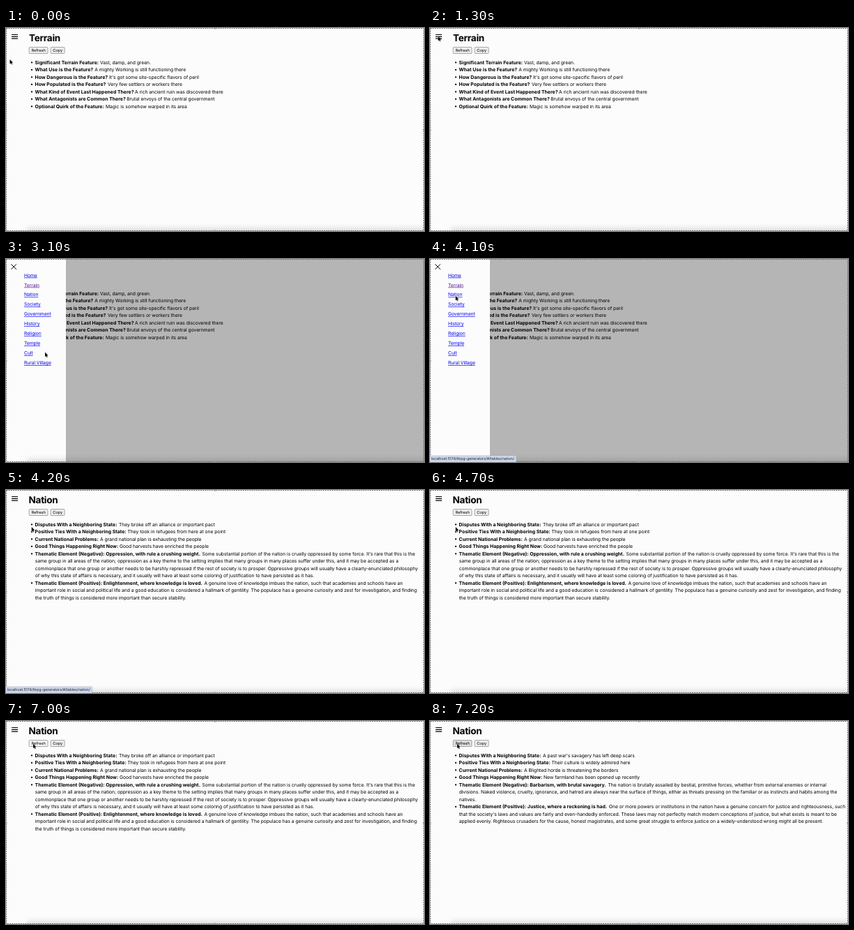
These frames come from a looping animation (600x291 px, 8000 ms). An HTML page:

```html
<!DOCTYPE html>
<html lang="en">
<head>
<meta charset="utf-8">
<title>Terrain and nation tables</title>
<style>
html, body { margin: 0; width: 100%; height: 100%; overflow: hidden; background: #fcfcfc; }
svg { display: block; width: 100%; height: 100%; }
text { font: 6.8px Inter, sans-serif; letter-spacing: -.009em; text-rendering: geometricPrecision; }
.bold { font-size: 6.9px; font-weight: 700; letter-spacing: 0; }
.title { font-size: 13.5px; font-weight: 700; letter-spacing: -.02em; }
.button { fill: #efefef; stroke: #707070; stroke-width: .6; }
.label { font-size: 5.7px; text-anchor: middle; }
.link { fill: #00e; letter-spacing: -.0125em; text-decoration: underline; }
.visited { fill: #551a8b; }
.status rect { fill: #cdd7ec; stroke: #a9b1c2; stroke-width: .5; }
.status text { font-size: 5.33px; fill: #222; }
.shade { filter: blur(4px); opacity: .13; }
.frame { fill: none; stroke: #707070; stroke-dasharray: 2 1.2; }
.handle { fill: #9a9a9a; }

#terrain, #nation, #before, #after, #menu, #society, #target, #refresh, #cursor {
  animation: 8s step-end infinite;
}
#terrain { animation-name: terrain; }
#nation { animation-name: nation; }
#before { animation-name: before; }
#after { animation-name: after; }
#menu { animation-name: menu; }
#society { animation-name: society; }
#target { animation-name: target; }
#refresh { animation-name: refresh; }
#cursor { animation-name: cursor; }

@keyframes terrain { 0% { opacity: 1 } 52.5%, 100% { opacity: 0 } }
@keyframes nation { 0% { opacity: 0 } 52.5%, 100% { opacity: 1 } }
@keyframes before { 0% { opacity: 1 } 90%, 100% { opacity: 0 } }
@keyframes after { 0% { opacity: 0 } 90%, 100% { opacity: 1 } }
@keyframes menu { 0% { opacity: 0 } 25% { opacity: 1 } 52.5%, 100% { opacity: 0 } }
@keyframes society { 0% { opacity: 0 } 46.25% { opacity: 1 } 48.75%, 100% { opacity: 0 } }
@keyframes target {
  0% { opacity: 0 }
  48.75% { opacity: 1 }
  55% { opacity: 1; animation-timing-function: steps(3) }
  58.75%, 100% { opacity: 0 }
}
@keyframes refresh {
  0% { fill: #efefef }
  77.5% { fill: #dfdfdf }
  87.5% { fill: #f5f5f5 }
  90%, 100% { fill: #dfdfdf }
}
/* The pointer advances once every 100 ms. */
@keyframes cursor {
  0% { transform: translate(5.5px, 45px); animation-timing-function: steps(2) }
  2.5% { transform: translate(6px, 41px); animation-timing-function: steps(4) }
  7.5% { transform: translate(10px, 18.5px); animation-timing-function: steps(2) }
  10% { transform: translate(10.7px, 14.5px) }
  12.5% { transform: translate(10.7px, 14.5px); animation-timing-function: steps(3) }
  16.25% { transform: translate(11.6px, 12px) }
  25% { transform: translate(11.6px, 12px); animation-timing-function: steps(2) }
  27.5% { transform: translate(12.2px, 13.3px) }
  28.75% { transform: translate(12.2px, 13.3px); animation-timing-function: steps(2) }
  31.25% { transform: translate(20px, 35px); animation-timing-function: steps(4) }
  36.25% { transform: translate(50px, 115px); animation-timing-function: steps(3) }
  40% { transform: translate(59px, 143px); animation-timing-function: steps(3) }
  43.75% { transform: translate(54px, 105px); animation-timing-function: steps(2) }
  46.25% { transform: translate(47px, 66px); animation-timing-function: steps(2) }
  48.75% { transform: translate(41px, 42px); animation-timing-function: steps(2) }
  51.25% { transform: translate(36.7px, 53px) }
  68.75% { transform: translate(36.7px, 53px); animation-timing-function: steps(3) }
  72.5% { transform: translate(28.5px, 44px); animation-timing-function: steps(3) }
  76.25% { transform: translate(31.5px, 33.5px); animation-timing-function: steps(3) }
  80% { transform: translate(38px, 32px) }
  81.25%, 100% { transform: translate(39px, 32.6px) }
}
</style>
</head>
<body>
<svg viewBox="0 0 600 291">
  <rect width="600" height="291" fill="#fcfcfc"/>
  <path d="M8 9.5h9M8 12.3h9M8 15.1h9" stroke="#000" stroke-width="1.2"/>
  <rect id="refresh" class="button" x="33.2" y="27.6" width="26.8" height="8.9" rx="1"/>
  <rect class="button" x="64.1" y="27.6" width="20" height="8.9" rx="1"/>
  <text class="label" x="46.7" y="34.1">Refresh</text>
  <text class="label" x="74.1" y="34.1">Copy</text>

  <g id="terrain"><text class="title" x="33" y="18.9">Terrain</text><g id="land"></g></g>
  <g id="nation">
    <text class="title" x="32.6" y="18.9">Nation</text>
    <g id="before"></g>
    <g id="after"></g>
  </g>
  <g id="menu">
    <rect width="600" height="291" fill-opacity=".283"/>
    <rect width="86" height="291" fill="#fcfcfc"/>
    <path d="M7.4 7.4l7.5 7.5M14.9 7.4l-7.5 7.5" stroke="#000"/>
    <g id="links"></g>
  </g>

  <rect class="shade" x="30" y="287" width="590" height="16"/>
  <rect class="frame" x=".5" y=".5" width="599" height="290"/>
  <g class="handle">
    <circle cx="300" cy=".5" r="1.2"/><circle cx="300" cy="290.5" r="1.2"/>
    <circle cx=".5" cy="146" r="1.2"/><circle cx="599.5" cy="146" r="1.2"/>
  </g>

  <g id="society" class="status">
    <rect x="-2" y="281.9" width="128.6" height="12" rx="1.5"/>
    <text x="1.7" y="288.2">localhost:5174/ttrpg-generators/#/tables/society/</text>
  </g>
  <g id="target" class="status">
    <rect x="-2" y="281.9" width="125.8" height="12" rx="1.5"/>
    <text x="1.7" y="288.2">localhost:5174/ttrpg-generators/#/tables/nation/</text>
  </g>
  <path id="cursor" d="M0 0V6.6L1.5 5.2 2.6 7.6 3.6 7.1 2.6 4.8H4.6Z" stroke="#fff" stroke-width=".5" paint-order="stroke"/>
</svg>
<script>
const fill = (id, markup) => { document.getElementById(id).innerHTML = markup.join(''); };

// Each item is [heading, x of its text, first line, ...wrapped lines].
function list(id, items) {
  let y = 51.5;
  const line = (x, text, kind = '') => `<text class="${kind}" x="${x}" y="${y}">${text}</text>`;
  fill(id, items.map(([heading, x, first, ...rest]) => {
    let out = `<circle cx="37" cy="${y - 2.1}" r="1.1"/>` + line(41.6, heading, 'bold') + line(x, first);
    y += 10.5;
    for (const text of rest) {
      out += line(41.7, text);
      y += 10.5;
    }
    return out;
  }));
}

list('land', [
  ['Significant Terrain Feature:', 135, 'Vast, damp, and green.'],
  ['What Use is the Feature?', 127.2, 'A mighty Working is still functioning there'],
  ['How Dangerous is the Feature?', 148, "It's got some site-specific flavors of peril"],
  ['How Populated is the Feature?', 146, 'Very few settlers or workers there'],
  ['What Kind of Event Last Happened There?', 185, 'A rich ancient ruin was discovered there'],
  ['What Antagonists are Common There?', 173.2, 'Brutal envoys of the central government'],
  ['Optional Quirk of the Feature:', 143, 'Magic is somehow warped in its area'],
]);

const headings = [
  ['Disputes With a Neighboring State:', 162],
  ['Positive Ties With a Neighboring State:', 174.5],
  ['Current National Problems:', 135],
  ['Good Things Happening Right Now:', 163],
];

list('before', [
  [...headings[0], 'They broke off an alliance or important pact'],
  [...headings[1], 'They took in refugees from here at one point'],
  [...headings[2], 'A grand national plan is exhausting the people'],
  [...headings[3], 'Good harvests have enriched the people'],
  ['Thematic Element (Negative): Oppression, with rule a crushing weight.', 281.4,
    "Some substantial portion of the nation is cruelly oppressed by some force. It's rare that this is the",
    'same group in all areas of the nation; oppression as a key theme to the setting implies that many groups in many places suffer under this, and it may be accepted as a',
    'commonplace that one group or another needs to be harshly repressed if the rest of society is to prosper. Oppressive groups will usually have a clearly-enunciated philosophy',
    'of why this state of affairs is necessary, and it usually will have at least some coloring of justification to have persisted as it has.'],
  ['Thematic Element (Positive): Enlightenment, where knowledge is loved.', 284.4,
    'A genuine love of knowledge imbues the nation, such that academies and schools have an',
    'important role in social and political life and a good education is considered a hallmark of gentility. The populace has a genuine curiosity and zest for investigation, and finding',
    'the truth of things is considered more important than secure stability.'],
]);

list('after', [
  [...headings[0], "A past war's savagery has left deep scars"],
  [...headings[1], 'Their culture is widely admired here'],
  [...headings[2], 'A Blighted horde is threatening the borders'],
  [...headings[3], 'New farmland has been opened up recently'],
  ['Thematic Element (Negative): Barbarism, with brutal savagery.', 255.4,
    'The nation is brutally assailed by bestial, primitive forces, whether from external enemies or internal',
    'divisions. Naked violence, cruelty, ignorance, and hatred are always near the surface of things, either as threats pressing on the familiar or as instincts and habits among the',
    'natives.'],
  ['Thematic Element (Positive): Justice, where a reckoning is had.', 256.8,
    'One or more powers or institutions in the nation have a genuine concern for justice and righteousness, such',
    "that the society's laws and values are fairly and even-handedly enforced. These laws may not perfectly match modern conceptions of justice, but what exists is meant to be",
    'applied evenly. Righteous crusaders for the cause, honest magistrates, and some great struggle to enforce justice on a widely-understood wrong might all be present.'],
]);

const pages = ['Home', 'Terrain', 'Nation', 'Society', 'Government', 'History', 'Religion', 'Temple', 'Cult', 'Rural Village'];
fill('links', pages.map((name, i) =>
  `<text class="link ${name === 'Terrain' ? 'visited' : ''}" x="26" y="${25.6 + 13.94 * i}">${name}</text>`));
</script>
</body>
</html>
```
